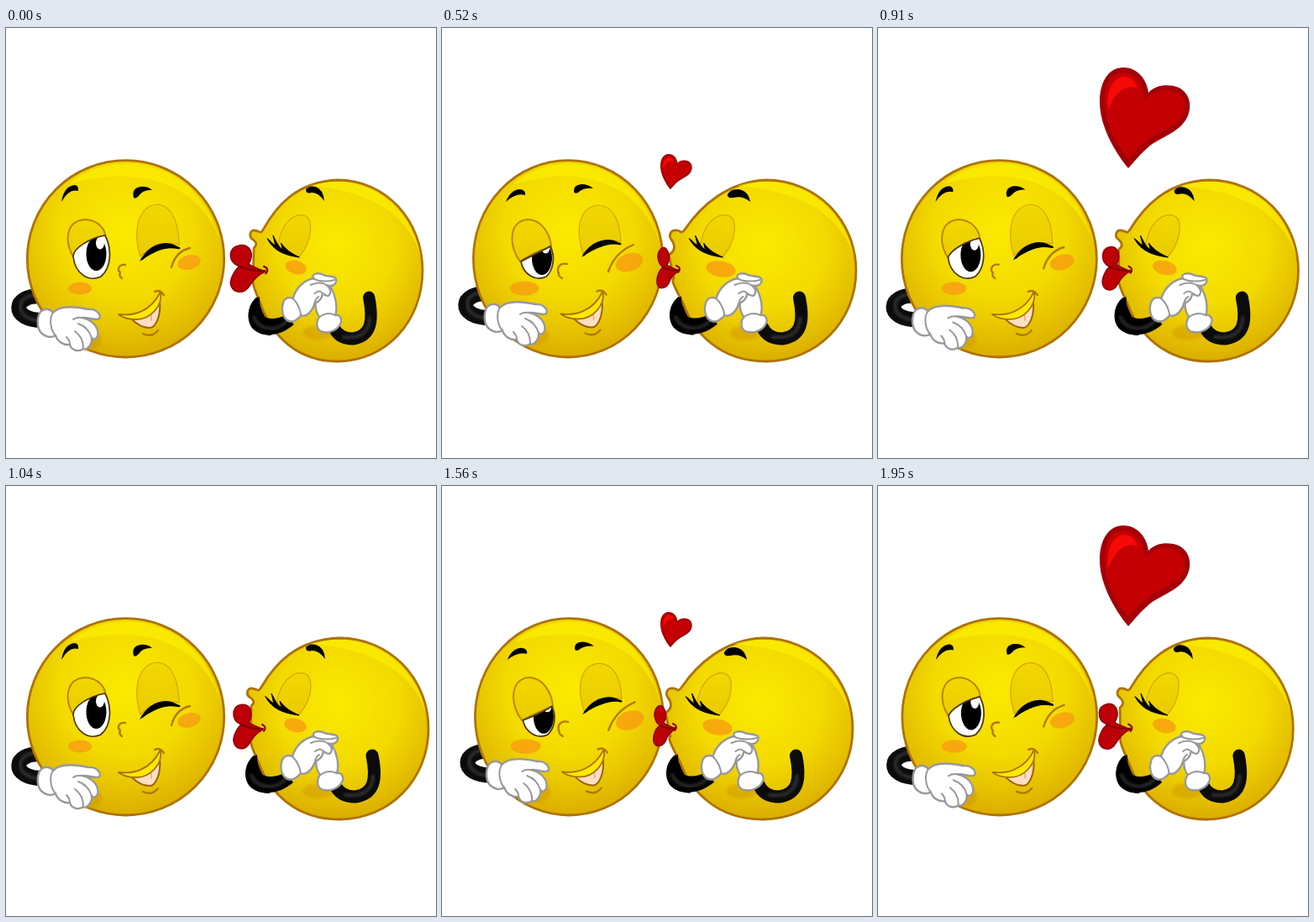
An HTML page that plays this animation: 512 px wide and 512 px high, repeating every 2080 ms.

```html
<!DOCTYPE html>
<html lang="en">
<head>
<meta charset="utf-8">
<title>Kissing smileys</title>
<style>
html, body { margin: 0; width: 100%; height: 100%; overflow: hidden; background: #fff }
svg { display: block; width: 100vw; height: 100vh }
path, ellipse { stroke-linejoin: round; stroke-linecap: round }
.line { fill: none; stroke: #b27a00; stroke-width: 2.4 }
.body { fill: url(#skin); stroke: #ad7208; stroke-width: 2.8 }
.rim { fill: #fff600; opacity: .55 }
.lid { fill: url(#lid); stroke: #d3a500; stroke-width: 1.2 }
.blush { fill: #f7a010; opacity: .85 }
.arm { fill: none; stroke: #0b0b0b; stroke-width: 18; stroke-linecap: butt }
.shine { fill: none; stroke: #666; stroke-width: 4; opacity: .4; filter: url(#soft) }
.glove path { fill: #fff; stroke: #98989c; stroke-width: 2.4 }
.glove .fold { fill: none; stroke-width: 2 }
.shade { fill: #d29800; opacity: .5; filter: url(#soft) }
</style>
</head>
<body>
<!-- data-to holds the kissing pose of a path or group -->
<svg viewBox="0 0 512 512">
<defs>
  <radialGradient id="skin" cx=".5" cy=".36" r=".68">
    <stop offset="0" stop-color="#fbea00"/><stop offset=".5" stop-color="#f3da00"/>
    <stop offset=".82" stop-color="#e2bb00"/><stop offset="1" stop-color="#d8a600"/>
  </radialGradient>
  <linearGradient id="lid" x2="0" y2="1">
    <stop offset="0" stop-color="#f2d800"/><stop offset="1" stop-color="#eacb00"/>
  </linearGradient>
  <filter id="soft"><feGaussianBlur stdDeviation="1.6"/></filter>
  <clipPath id="eye">
    <path d="M80 272C80 262 100 250 118 247C126 262 126 285 113 296C98 303 82 292 80 272Z"
      data-to="M94 278C103 273 118 266 129 260C135 272 133 288 124 296C112 302 97 294 94 278Z"/>
  </clipPath>
</defs>

<g id="left">
  <g transform="translate(0 0)" data-to="translate(13 -3)">
    <path class="arm" d="M42 319.500C8 317 4 348 44 348"/>
    <path class="shine" d="M34 318C12 319 10 344 36 348"/>
  </g>
  <g transform="translate(0 0) scale(1 1)" data-to="translate(13 0) scale(.962 1)">
    <ellipse class="body" cx="142.500" cy="274.800" rx="117.200" ry="117.200"/>
    <path class="rim" d="M75 186C120 145 230 148 256 258C238 195 170 158 75 186Z"/>
  </g>

  <path d="M66 207Q69 188 82 187Q87 188 86 194Q75 191 66 207Z"
    data-to="M76 207Q82 192 93 192Q100 193 99 199Q88 196 76 207Z"/>
  <path d="M152 202Q149 191 160 189Q168 188 174 193Q163 192 158 200Q154 204 152 202Z"
    data-to="M157 195Q156 187 166 186Q174 186 180 191Q168 190 162 196Q158 198 157 195Z"/>

  <path class="lid" style="stroke:#b98600;stroke-width:2"
    d="M80 272C70 255 70 229 95 228C110 229 118 240 118 247C100 250 84 262 80 272Z"
    data-to="M93 278C80 262 78 230 102 228C119 228 129 246 130 260C114 266 100 273 93 278Z"/>
  <g clip-path="url(#eye)">
    <path fill="#fff" d="M70 230H140V310H70Z"/>
    <g transform="translate(0 0)" data-to="translate(11.500 5)">
      <ellipse cx="107.500" cy="269" rx="12" ry="20"/>
      <ellipse cx="112" cy="256" rx="5" ry="7.500" fill="#fff"/>
    </g>
  </g>
  <path fill="none" stroke="#4a3405" stroke-width="1.700"
    d="M80 272C80 262 100 250 118 247C126 262 126 285 113 296C98 303 82 292 80 272Z"
    data-to="M94 278C103 273 118 266 129 260C135 272 133 288 124 296C112 302 97 294 94 278Z"/>

  <path class="lid" d="M160 272C150 240 158 212 180 210C200 211 206 238 206 258Q180 252 160 272Z"
    data-to="M168 269C158 238 164 213 186 211C206 212 212 234 213 254Q186 249 168 269Z"/>
  <path d="M159 278Q170 257 190 256Q200 256 208 263Q188 257 159 278Z"
    data-to="M166 273Q177 253 197 252Q207 252 214 258Q194 254 166 273Z"/>
  <path fill="none" stroke="#000" stroke-width="2.500" d="M162 275Q180 257 206 262" data-to="M169 270Q187 252 212 257"/>

  <ellipse class="blush" rx="14" ry="7.500" transform="translate(88 310) scale(1 1)" data-to="translate(98 310) scale(1.24 1.15)"/>
  <ellipse class="blush" rx="14" ry="8.500" transform="translate(218 279) rotate(-15) scale(1 1)" data-to="translate(223 279) rotate(-18) scale(1.2 1.25)"/>
  <path class="line" d="M197 285Q202 266 219 262" data-to="M198 290Q206 267 228 258"/>
  <path class="line" d="M142 282C134 281 132 288 136 291Q134 295 138 298"
    data-to="M149 281C140 279 136 286 139 292Q138 295 143 298"/>

  <g transform="translate(0 0)" data-to="translate(7.500 -.5)">
    <path fill="#ffdfc4" stroke="#9b6208" stroke-width="2" d="M150 347C165 345 178 337 183 324C185 343 178 357 171 357C163 357 155 352 150 347Z"/>
    <path fill="none" stroke="#e7a77f" stroke-width="1.500" d="M170 340Q174 342 173 348"/>
    <path fill="#ffe900" stroke="#a87000" stroke-width="1.800" d="M134 341C150 343 172 339 184 314C187 331 172 347 155 347C146 347 139 345 134 341Z"/>
    <path class="line" d="M177 314Q183 311 188 318M163 364Q174 369 181 360"/>
  </g>

  <g transform="translate(0 0)" data-to="translate(13 -6)">
    <ellipse class="shade" cx="98" cy="372" rx="16" ry="12"/>
    <g class="glove">
      <path d="M42 337C48 333 54 335 56 339C63 331 80 331 98 335C108 334 114 342 111 346C107 349 98 344 91 345C98 346 107 352 109 360C111 368 106 373 102 369C103 376 97 384 92 382C86 386 78 384 76 377C68 378 61 373 59 366C53 370 45 367 41 362C36 355 37 342 42 337Z"/>
      <path class="fold" d="M56 339C51 346 53 360 59 366M91 345Q84 344 80 347M86 352Q98 356 102 369M82 361Q92 368 92 381M72 368Q76 372 76 377"/>
    </g>
  </g>
</g>

<g id="right">
  <g transform="translate(0 0)" data-to="translate(-14 -.5)">
    <path d="M301 318C284 323 281 350 292 359C298 364 306 366 314 366L312 330Z"/>
  </g>
  <path class="body" d="M397 181C457 181 503 229 503 289C503 349 457 397 397 397C345 397 314 365 301 330C294 314 290 305 291 300L292 262C296 258 296 256 291 252C285 249 287 240 293 241C298 241 300 246 303 241C320 212 345 183 397 181Z"
    data-to="M386 181C446 181 493 229 493 289C493 349 446 397 386 397C330 397 300 362 288 330C278 310 272 300 276 298L270 270C278 266 278 258 273 252C269 246 273 240 279 241C284 240 284 247 289 240C308 212 340 183 386 181Z"/>
  <g transform="translate(0 0)" data-to="translate(-10.500 0)">
    <path class="rim" d="M362 188C420 170 485 200 501 272C482 215 428 193 362 188Z"/>
    <ellipse class="shade" cx="372" cy="363" rx="19" ry="9"/>
  </g>

  <path d="M357 192Q362 187 369 189Q379 192 380 206Q372 195 364 196Q357 198 357 192Z"
    data-to="M340 198Q344 191 353 192Q365 194 367 207Q358 199 347 202Q339 203 340 198Z"/>
  <g transform="translate(0 0)" data-to="translate(-14.500 0)">
    <path class="lid" d="M322 261C325 235 340 220 355 223C368 228 364 255 349 272Q334 270 322 261Z"/>
    <path stroke="#000" d="M309 251C315 262 325 270 349 273C338 268 332 264 326 256L328 264C322 260 320 254 316 247L319 259C314 256 312 252 309 251Z"/>
  </g>
  <ellipse class="blush" rx="13.500" ry="8" transform="translate(344.500 285) rotate(14) scale(1 1)" data-to="translate(332 287) rotate(10) scale(1.32 1.18)"/>

  <g id="lips">
    <path fill="#bd0008" stroke="#8f0008" stroke-width="1.500"
      d="M290 264C285 258 273 259 271 269C270 278 275 282 280 284C276 287 270 298 271 304C273 314 283 315 288 309C293 302 297 294 306 290C299 286 293 285 289 281C293 276 293 268 290 264Z"
      data-to="M267 263C264 259 257 263 257 273C258 280 261 284 264 285C259 287 255 296 256 304C258 312 266 311 270 304C272 298 275 293 282 289C276 286 272 285 268 282C272 276 271 268 267 263Z"/>
    <path fill="none" stroke="#7d0006" stroke-width="2" d="M280 284Q292 290 306 289M305 284Q311 287 307 292"
      data-to="M264 285Q272 290 282 288M279 283Q286 286 281 291"/>
  </g>

  <g transform="translate(0 0)" data-to="translate(-14 -.5)">
    <path d="M299 320C283 326 281 350 292 359C304 369 326 367 342 353L333 341C322 347 308 348 304 342C300 335 299 326 299 320Z"/>
    <path class="shine" d="M292 344Q297 357 314 358Q326 357 333 349"/>
  </g>
  <g transform="translate(0 0)" data-to="translate(-10.500 0)">
    <path class="arm" style="stroke-width:15;stroke-linecap:round" d="M436 321C442 350 438 367 416 370C404 370 396 366 392 356"/>
    <path class="shine" d="M437 345C436 364 424 370 404 368"/>
  </g>
  <g class="glove" transform="translate(0 0)" data-to="translate(-14.500 0)">
    <path d="M372 316C367 326 369 338 374 344C369 350 370 361 379 362C388 364 399 358 401 350C402 344 398 341 394 342C397 331 394 318 388 308Z"/>
    <path d="M329 326C326 334 327 346 336 349C342 351 348 346 351 342C358 345 365 337 368 328C374 326 377 322 378 316Q387 323 388 313Q387 309 383 306C390 309 396 305 395 299C393 294 383 297 377 293C370 291 363 294 367 298C356 300 345 308 341 322C336 320 331 321 329 326Z"/>
    <path class="fold" d="M365 298Q378 304 393 300M363 306Q374 301 383 306M341 322Q349 330 351 342M374 344Q384 337 394 342M368 316Q374 311 378 316M368 328Q369 322 373 320"/>
  </g>
</g>

<g id="heart">
  <path fill="#a30008" d="M34 120C16 98 0 68 0 41C0 15 12 0 28 0C44 0 56 13 58 30C66 21 78 20 88 22C102 25 109 37 107 50C103 75 76 81 60 93C48 103 42 111 34 120Z"/>
  <path fill="#c50003" d="M34 109C19 90 6 65 6 41C6 18 15 6 28 6C41 6 51 17 54 39C64 27 77 25 86 28C98 31 103 40 101 50C97 70 72 75 56 87C46 95 40 102 34 109Z"/>
  <path fill="#f50a05" d="M10 51C7 27 17 11 29 11C37 11 43 17 45 25C32 19 18 29 10 51Z"/>
</g>
</svg>

<script>
const STEP = 130, FRAMES = 16;
const $ = id => document.getElementById(id);
const lerp = (a, b, k) => a + (b - a) * k;

// Key values at every fourth step, joined linearly around the loop.
const track = (keys, step) => {
  const i = Math.floor(step / 4);
  return lerp(keys[i], keys[(i + 1) % 4], step % 4 / 4);
};

const NUMBER = /-?(?:\d+\.?\d*|\.\d+)/g;
const morphs = side => [...document.querySelectorAll(side + ' [data-to]')].map(el => {
  const attr = el.hasAttribute('d') ? 'd' : 'transform';
  return { el, attr, from: el.getAttribute(attr), to: el.dataset.to.match(NUMBER) };
});
const pose = (parts, k) => parts.forEach(({ el, attr, from, to }) => {
  let i = 0;
  el.setAttribute(attr, from.replace(NUMBER, n => lerp(+n, +to[i++], k).toFixed(3)));
});
const leftParts = [...morphs('#left'), ...morphs('#eye')];
const rightParts = morphs('#right');

// Heart left, top and width, from its appearance to its last step.
const hearts = [[260, 193, 27], [260, 171.5, 32.5], [260, 150, 38], [257.5, 114.5, 61.5], [255, 79, 85], [264, 47, 108]];

function draw(step) {
  pose(leftParts, track([0, 1, 0, 1.17], step));
  pose(rightParts, track([0, 1, 0, 1], step));

  const squash = track([1, 0, 0, 0], step), shift = track([0, 0, 0, -4], step);
  $('right').setAttribute('transform', `translate(${357 + shift}) scale(${1 - .048 * squash} 1) translate(-357)`);
  $('lips').setAttribute('transform', `translate(307 287) scale(${1 + .22 * squash} ${1 + .06 * squash}) translate(-307 -287)`);

  const heart = hearts[step % 8 - 2];
  $('heart').style.display = heart ? '' : 'none';
  if (heart) $('heart').setAttribute('transform', `translate(${heart[0]} ${heart[1]}) scale(${heart[2] / 108})`);
}

const start = performance.now();
function tick() {
  draw(Math.floor((performance.now() - start) / STEP) % FRAMES);
  requestAnimationFrame(tick);
}
tick();
</script>
</body>
</html>
```
